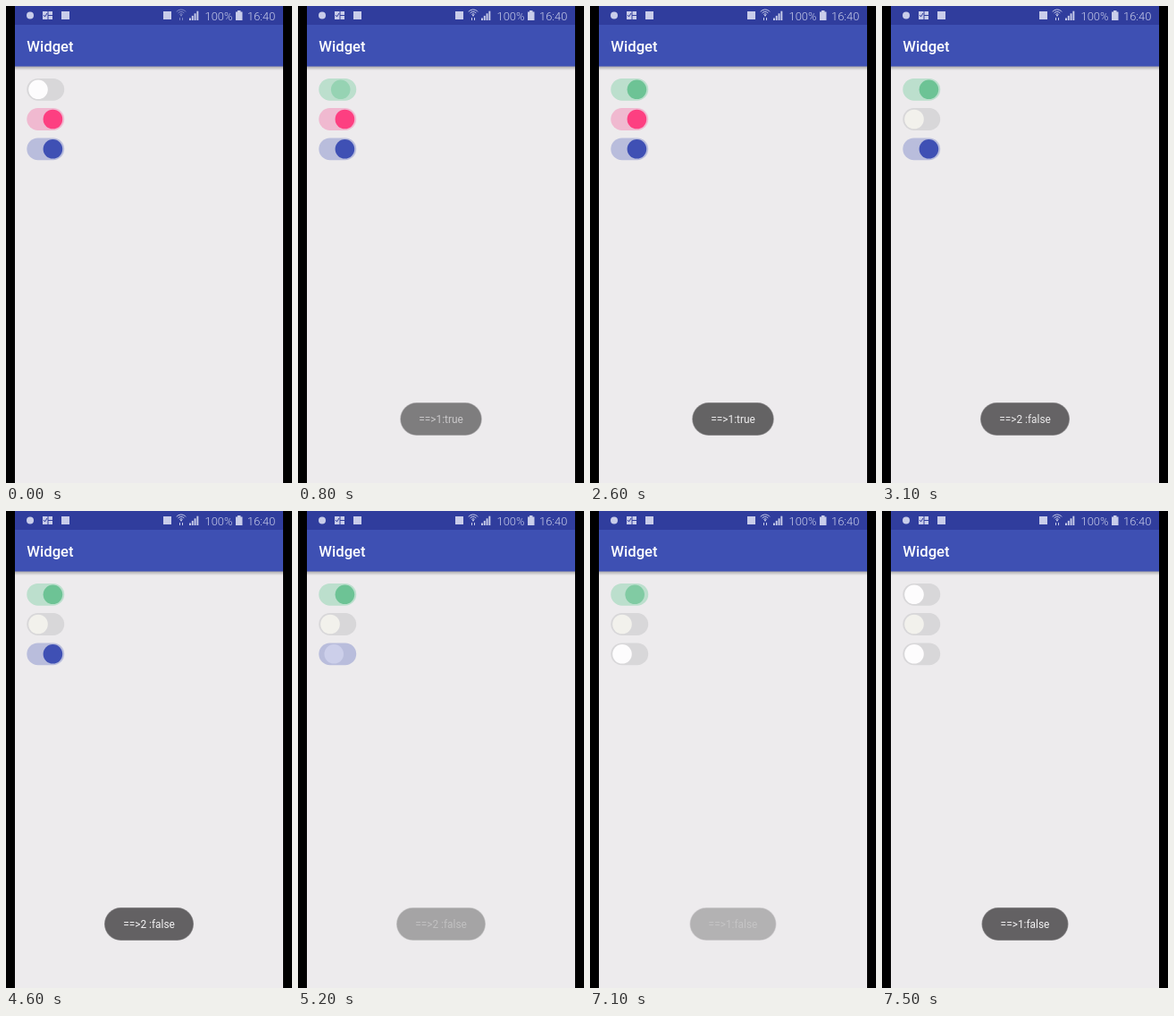
An HTML page with a canvas that plays this animation: 320x533 px, repeating every 8 s.

```html
<!DOCTYPE html>
<html lang="en">
<head>
<meta charset="utf-8">
<title>Switch widgets</title>
<style>
  html, body { margin: 0; width: 100%; height: 100%; overflow: hidden; background: #000; }
  canvas { display: block; width: 320px; height: 533px; }
</style>
</head>
<body>
<canvas id="stage" width="320" height="533"></canvas>
<script>
const ctx = document.getElementById('stage').getContext('2d');
const LOOP = 8000, STEP = 100, SLIDE = 250, FADE = 400;
const ICON = '#c9cdea';

const OFF_TRACK = [216, 215, 217];
const WHITE = [253, 252, 253];

// Each flip is [start time, new state].
const switches = [
  { y: 93.3, on: false, flips: [[640, true], [7040, false]],
    track: [188, 223, 205], knob: [109, 195, 149], offKnob: WHITE },
  { y: 126.5, on: true, flips: [[2740, false]],
    track: [240, 185, 208], knob: [253, 63, 129], offKnob: [242, 241, 236] },
  { y: 159.8, on: true, flips: [[5035, false]],
    track: [185, 189, 220], knob: [63, 80, 180], offKnob: WHITE }
];

const toasts = [
  { text: '==>1:true', width: 91.5, show: 640, hide: 2510 },
  { text: '==>2 :false', width: 100, show: 2800, hide: 4880 },
  { text: '==>1:false', width: 97, show: 7040, hide: Infinity }
];

const clamp = v => Math.max(0, Math.min(1, v));
const easeInOut = v => 0.5 - 0.5 * Math.cos(Math.PI * clamp(v));
const mix = (a, b, k) => `rgb(${a.map((v, i) => Math.round(v + (b[i] - v) * k))})`;

function rect(x, y, w, h, color) {
  ctx.fillStyle = color;
  ctx.fillRect(x, y, w, h);
}

function circle(x, y, r, color) {
  ctx.fillStyle = color;
  ctx.beginPath();
  ctx.arc(x, y, r, 0, Math.PI * 2);
  ctx.fill();
}

function pill(x, y, w, h, color) {
  ctx.fillStyle = color;
  ctx.beginPath();
  ctx.roundRect(x, y, w, h, h / 2);
  ctx.fill();
}

function label(text, x, y, font, color, align = 'left') {
  ctx.font = `${font} Roboto, sans-serif`;
  ctx.textAlign = align;
  ctx.fillStyle = color;
  ctx.fillText(text, x, y);
}

function drawWifi(active) {
  ctx.save();
  ctx.globalAlpha = active ? 1 : 0.5;
  ctx.strokeStyle = ICON;
  ctx.lineWidth = 1;
  for (const r of [2.3, 4.6, 7]) {
    ctx.beginPath();
    ctx.arc(196, 11, r, -Math.PI * 0.77, -Math.PI * 0.23);
    ctx.stroke();
  }
  circle(196, 10.5, 1, ICON);
  rect(194, 13, 1, 3, ICON);
  rect(197, 13, 1, 3, ICON);
  ctx.restore();
}

function drawStatusBar(active) {
  rect(10, 0, 300, 21, '#303d9d');
  circle(27, 10.5, 4, ICON);
  rect(41, 6, 5.5, 9, ICON);
  for (const y of [6, 11]) rect(47.5, y, 4.5, 4, ICON);
  ctx.strokeStyle = '#303d9d';
  ctx.lineWidth = 1;
  ctx.beginPath();
  ctx.moveTo(42, 10);
  ctx.lineTo(43.5, 12);
  ctx.lineTo(46, 8);
  ctx.stroke();
  rect(62, 6, 9, 9, ICON);
  rect(176, 6, 9, 9, ICON);
  drawWifi(active);
  for (let i = 0; i < 4; i++) {
    const h = 2.5 + i * 2.6;
    rect(205 + i * 2.8, 16 - h, 1.9, h, ICON);
  }
  label('100%', 222.5, 15.5, '300 12.9px', ICON);
  rect(259, 5, 3.5, 2, ICON);
  rect(257, 6.5, 7.5, 9.5, ICON);
  label('16:40', 270, 15.5, '300 12.9px', ICON);
}

function drawAppBar() {
  const shadow = ctx.createLinearGradient(0, 67, 0, 72);
  shadow.addColorStop(0, 'rgba(0,0,0,.3)');
  shadow.addColorStop(1, 'rgba(0,0,0,0)');
  rect(10, 67, 300, 5, shadow);
  rect(10, 21, 300, 46.5, '#3e50b3');
  label('Widget', 23.3, 51, '500 16.67px', '#fff');
}

function switchPosition(sw, t) {
  let pos = sw.on ? 1 : 0;
  for (const [start, state] of sw.flips) {
    if (t < start) continue;
    const k = easeInOut((t - start) / SLIDE);
    pos = state ? k : 1 - k;
  }
  return pos;
}

function drawSwitch(sw, t) {
  const pos = switchPosition(sw, t);
  pill(23.3, sw.y - 12.4, 41.9, 24.8, mix(OFF_TRACK, sw.track, clamp(pos * 4)));
  circle(36 + 16.4 * pos, sw.y, 10.8, mix(sw.offKnob, sw.knob, pos));
}

function toastAlpha({ show, hide }, t) {
  const fadeIn = 1 - (1 - clamp((t - show) / FADE)) ** 2;
  const fadeOut = 1 - clamp((t - hide) / FADE) ** 2;
  return fadeIn * fadeOut;
}

function drawToast(toast, t) {
  const alpha = toastAlpha(toast, t);
  if (alpha <= 0) return;
  const x = 160 - toast.width / 2;
  ctx.save();
  ctx.globalAlpha = alpha;
  pill(x, 443, toast.width, 37, '#8f8d8f');
  pill(x + 0.7, 443.7, toast.width - 1.4, 35.6, '#636163');
  label(toast.text, 160, 466.3, '400 11.9px', '#f4f3f4', 'center');
  ctx.restore();
}

function draw(now) {
  const t = Math.floor((now % LOOP) / STEP) * STEP;
  rect(0, 0, 320, 533, '#000');
  rect(10, 0, 300, 533, '#edebed');
  drawStatusBar(t >= 500);
  drawAppBar();
  switches.forEach(sw => drawSwitch(sw, t));
  toasts.forEach(toast => drawToast(toast, t));
}

let origin;
function frame(now) {
  origin ??= now;
  draw(now - origin);
  requestAnimationFrame(frame);
}
requestAnimationFrame(frame);
</script>
</body>
</html>
```
